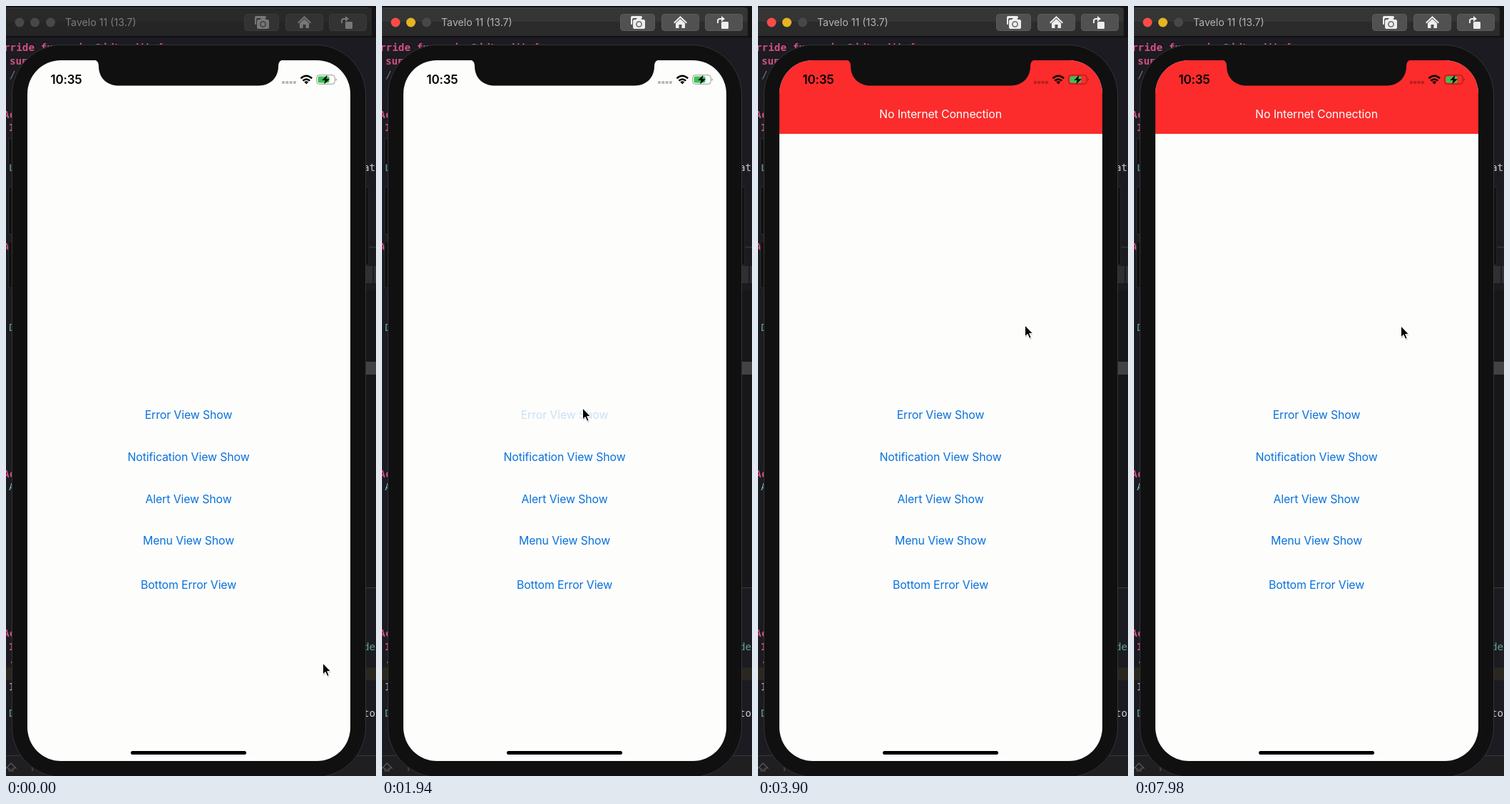
Write an HTML page that moves like this. It is 519 by 1078 pixels and loops after 8000 ms.

```html
<!DOCTYPE html>
<html lang="en">
<head>
<meta charset="utf-8">
<title>Error banner demo</title>
<style>
  html, body { margin: 0; width: 100%; height: 100%; overflow: hidden; background: #1a1a20; }
  svg { display: block; width: 519px; height: 1078px; font-family: Inter, "Open Sans", sans-serif; }
  text { white-space: pre; }

  .code { font: 14.3px "DejaVu Sans Mono", monospace; fill: #c9c9cc; }
  .kw { fill: #d2517f; font-weight: bold; }
  .type { fill: #5fa391; }
  .call { fill: #77b9c8; }
  .dim { fill: #6d7680; }

  .label { font-size: 15.9px; letter-spacing: -.13px; text-anchor: middle; }
  .links { fill: #0a72dc; }
  .clock { font-size: 17px; font-weight: 600; letter-spacing: -.2px; }
  .side { fill: #121213; stroke: #2b2b2d; }

  .off { --bar1: #29292a; --bar2: #252526; --btn: #333334; --edge: #3a3a3b; --icon: #777778;
         --title: #7c7c7d; --close: #48484a; --min: #48484a; }
  .on  { --bar1: #353536; --bar2: #2b2b2c; --btn: #515152; --edge: #5b5b5c; --icon: #ededed;
         --title: #b4b4b5; --close: #fb4c48; --min: #e6b520; }

  .on, .banner, .tapped, .cursor { animation: 8s linear infinite; }
  .on { animation-name: focus; animation-timing-function: step-end; }
  .banner { animation-name: drop; }
  .tapped { animation-name: tap; }
  .cursor { animation-name: point; }

  @keyframes focus { 0% { opacity: 0; } 17.5%, 100% { opacity: 1; } }
  @keyframes drop {
    0% { transform: translateY(-104px); }
    25.5% { transform: translateY(-104px); animation-timing-function: ease-in-out; }
    29.75%, 100% { transform: none; }
  }
  @keyframes tap {
    0%, 24% { opacity: 1; }
    24.1%, 25.25% { opacity: .2; animation-timing-function: ease-out; }
    29.25%, 100% { opacity: 1; }
  }
  @keyframes point {
    0% { transform: translate(444px, 920px); }
    1.25% { transform: translate(444px, 920px); animation-timing-function: ease-in-out; }
    14.5% { transform: translate(274px, 563px); }
    16.5% { transform: translate(274px, 563px); animation-timing-function: ease-in-out; }
    21% { transform: translate(281px, 563px); }
    30% { transform: translate(281px, 563px); animation-timing-function: ease-in; }
    36.5% { transform: translate(357px, 478px); animation-timing-function: ease-out; }
    41.5%, 49% { transform: translate(374px, 447px); }
    55%, 74% { transform: translate(373px, 446px); }
    80%, 100% { transform: translate(374px, 448px); }
  }
</style>
</head>
<body>
<svg viewBox="0 0 519 1078">
  <defs>
    <clipPath id="screen"><rect x="30" y="76" width="453" height="981" rx="47"/></clipPath>

    <g id="bar">
      <path d="M0 2H508Q513 2 513 7V42H0Z" style="fill: var(--bar2)"/>
      <path d="M0 2H508Q513 2 513 7V22H0Z" style="fill: var(--bar1)"/>
      <path d="M0 2.5H508" stroke="#4a4a4b" stroke-opacity=".6"/>
      <circle cx="19" cy="23" r="6.5" style="fill: var(--close)"/>
      <circle cx="40.5" cy="23" r="6.5" style="fill: var(--min)"/>
      <circle cx="62.5" cy="23" r="6.5" fill="#48484a"/>
      <text x="83" y="28.3" font-size="14.2" style="fill: var(--title)">Tavelo 11 (13.7)</text>
      <g style="fill: var(--btn); stroke: var(--edge)">
        <rect x="334.5" y="11.5" width="48" height="23" rx="4"/>
        <rect x="392.5" y="11.5" width="52" height="23" rx="4"/>
        <rect x="453.5" y="11.5" width="52" height="23" rx="4"/>
      </g>
      <g style="fill: var(--icon)">
        <path d="M351 14H363Q365 14 365 16V17H353Q351 17 351 20V26H350Q349 26 349 25V16Q349 14 351 14Z"/>
        <path d="M354 19H356L358 17H363L365 19H367Q369 19 369 21V30Q369 32 367 32H354Q352 32 352 30V21Q352 19 354 19Z"/>
        <circle cx="360.5" cy="25.5" r="4.3" style="fill: var(--btn)"/>
        <circle cx="360.5" cy="25.5" r="3"/>
        <path d="M418.500 14L428 23L426.700 24.400L418.500 16.700L410.300 24.400L409 23Z"/>
        <path d="M418.500 18L425 24V31H420.500V26H416.500V31H412V24Z"/>
        <rect x="476" y="22" width="10" height="10" rx="1.500"/>
        <path d="M470 24V21Q470 17 474 17H476V14L481 18L476 22V19H474Q472 19 472 21V24Z"/>
      </g>
    </g>
  </defs>

  <!-- editor behind the device -->
  <rect width="519" height="1078" fill="#1b1b21"/>
  <rect width="519" height="2" fill="#101013"/>
  <rect x="513" y="2" width="6" height="40" fill="#141417"/>
  <rect y="42" width="519" height="2" fill="#111114"/>
  <rect y="926" width="519" height="18" fill="#29271f"/>
  <g class="code">
    <text class="kw" x="-3" y="63">rride func viewDidLoad() {</text>
    <text class="kw" x="5" y="82">super</text>
    <text class="dim" x="5" y="101">//</text>
    <text class="kw" x="-4" y="157">Ac</text>
    <text class="kw" x="4" y="175">I</text>
    <text class="type" x="4" y="231">L</text>
    <text class="kw" x="-4" y="342">A</text>
    <text class="type" x="4" y="455">D</text>
    <text class="kw" x="-4" y="660">Ac</text>
    <text class="call" x="4" y="678">A</text>
    <text class="kw" x="-4" y="883">Ac</text>
    <text class="kw" x="4" y="902">I</text>
    <text x="4" y="920">.</text>
    <text x="4" y="958">I</text>
    <text class="type" x="4" y="995">D</text>
    <text x="501" y="231">ato</text>
    <text class="type" x="501" y="902">deN</text>
    <text x="501" y="995">tor</text>
  </g>
  <g fill="none" stroke="#3b3b40">
    <path d="M505 337.500H519M505 814.500H519"/>
  </g>
  <rect x="505" y="364" width="9" height="24" fill="#303034"/>
  <rect x="516" y="364" width="3" height="24" fill="#303034"/>
  <rect x="505" y="398" width="14" height="416" fill="#17171a"/>
  <rect x="505" y="498" width="14" height="18" fill="#424245"/>
  <rect y="1050" width="519" height="28" fill="#1f1f22"/>
  <path d="M0 1049.500H519" stroke="#38383b"/>
  <path d="M0 1067L7 1060L14 1067H10V1069H4V1067ZM3 1071H11M37 1062V1071" fill="none" stroke="#5b5b5f" stroke-width="1.200"/>

  <g class="off"><use href="#bar"/></g>
  <g class="on"><use href="#bar"/></g>

  <!-- device -->
  <g class="side">
    <rect x="3.500" y="185.500" width="8" height="36" rx="2"/>
    <rect x="3.500" y="253.500" width="8" height="66" rx="2"/>
    <rect x="3.500" y="329.500" width="8" height="65" rx="2"/>
    <rect x="500" y="253.500" width="9" height="109" rx="2"/>
  </g>
  <rect x="8.500" y="54.500" width="496" height="1025" rx="70" fill="#101011" stroke="#333335"/>

  <g clip-path="url(#screen)">
    <rect x="30" y="76" width="453" height="981" fill="#fdfdfc"/>
    <g class="label links">
      <text class="tapped" x="256" y="578">Error View Show</text>
      <text x="256" y="637">Notification View Show</text>
      <text x="256" y="696">Alert View Show</text>
      <text x="256" y="754">Menu View Show</text>
      <text x="256" y="816">Bottom Error View</text>
    </g>
    <g class="banner">
      <rect x="30" y="75" width="453" height="104" fill="#fb2c2b"/>
      <text class="label" x="256" y="157.300" fill="#fff">No Internet Connection</text>
    </g>
    <path d="M122 75Q130 76 130 84C130 101 142 111.500 158 111.500H354C370 111.500 382 101 382 84Q382 76 390 75Z" fill="#101011"/>
    <rect x="175" y="1043" width="162" height="5" rx="2.500"/>
  </g>

  <!-- status bar -->
  <text class="clock" x="62.500" y="109">10:35</text>
  <g fill-opacity=".27">
    <rect x="387" y="105" width="4" height="4" rx="1"/>
    <rect x="392.300" y="105" width="4" height="4" rx="1"/>
    <rect x="397.600" y="105" width="4" height="4" rx="1"/>
    <rect x="402.900" y="105" width="4" height="4" rx="1"/>
  </g>
  <g fill="none" stroke="#000" stroke-width="2.500">
    <path d="M413.500 101.300Q421.300 94.300 429.100 101.300M416.400 104.600Q421.300 100.300 426.200 104.600"/>
  </g>
  <path d="M418.300 106.300Q421.300 104 424.300 106.300L421.300 109.400Z"/>
  <rect x="435.700" y="96.700" width="25.500" height="12.600" rx="3.600" fill="none" stroke="#000" stroke-opacity=".4"/>
  <path d="M462.700 101Q465 103 462.700 105Z" fill-opacity=".45"/>
  <rect x="437.500" y="98.500" width="16" height="9" rx="2" fill="#35c452"/>
  <path d="M450.500 96.800L443.200 104H447.600L446.200 109.600L453.900 102.200H449.300Z"/>

  <g class="cursor">
    <path d="M1 1.500V17.500L4.700 14.100L7.300 20L10 18.800L7.500 13.200H12Z" fill-opacity=".2"/>
    <path d="M.5 0V15.800L4.100 12.400L6.600 18.300L9.200 17.200L6.700 11.500H11.500Z" stroke="#fff"/>
  </g>
</svg>
</body>
</html>
```
